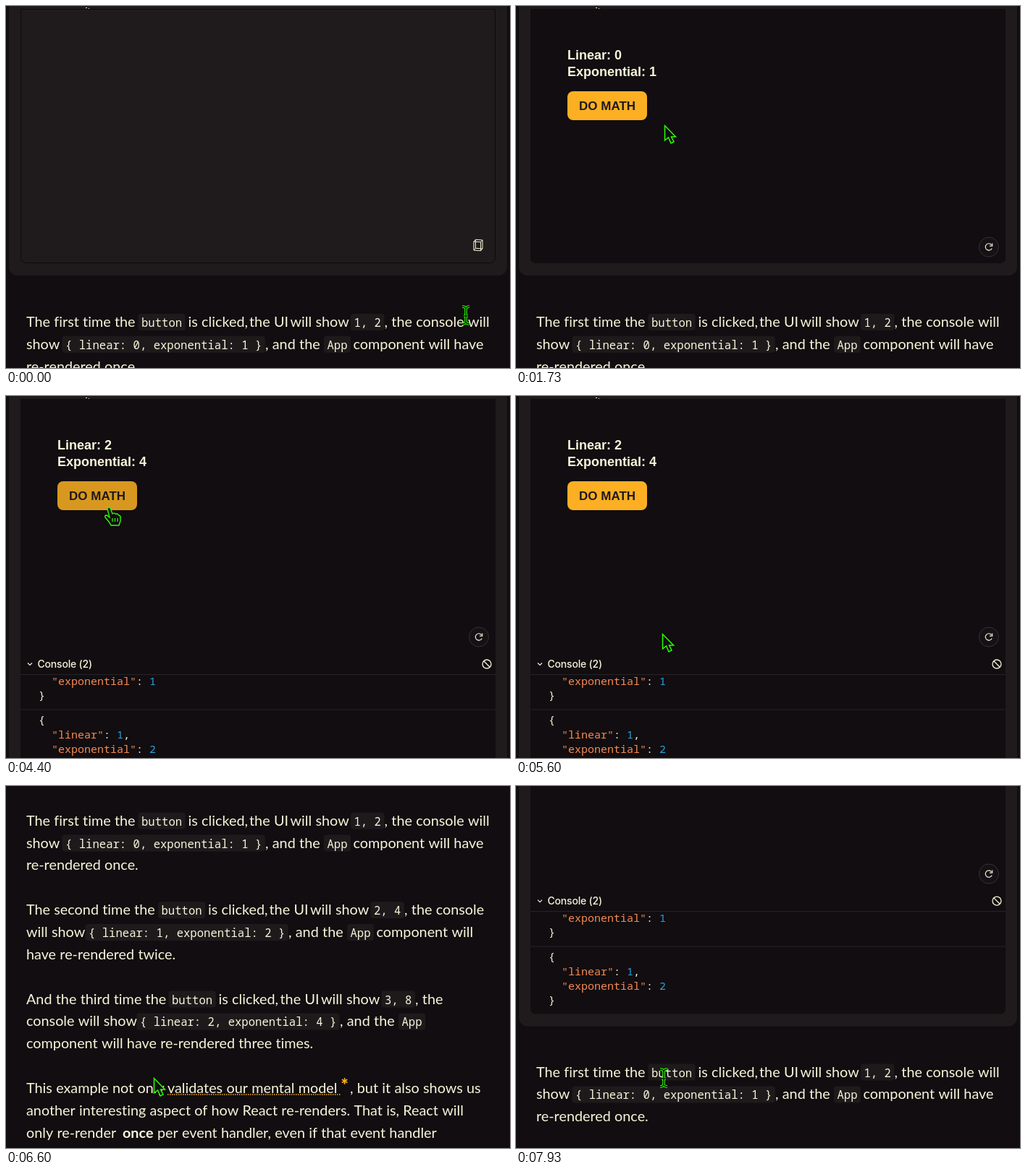
Write an HTML page with a canvas that moves like this. It is 696 px wide and 501 px high and loops after 8000 ms.

```html
<!DOCTYPE html>
<html lang="en">
<head>
<meta charset="utf-8">
<title>Batched state updates</title>
<style>
html, body { margin: 0; width: 100%; height: 100%; overflow: hidden; background: #110d10; }
canvas { display: block; width: 696px; height: 501px; }
</style>
</head>
<body>
<canvas id="stage" width="696" height="501"></canvas>
<script>
const ctx = document.getElementById('stage').getContext('2d');
const LOOP = 8000, LOADED = 450, CLICKS = [2240, 3740];
const PAGE = '#110d10', PANEL = '#1f1b1c', CREAM = '#f9f4da', AMBER = '#fcaf23';
const ORANGE = '#f78a52', BLUE = '#2ba3d8', GREEN = '#2bff00';
const BODY = '19.8px Lato, sans-serif';
const CODE = '500 15.6px "Noto Sans Mono", monospace';
const LINE = 30.85;

// Bottom of the preview box for 0, 1 and 2 logged entries.
const BOX_BOTTOM = [356, 479, 527.5];

// Each line is a list of [x, text, style].
const story = (intro, chipX, ui, uiX, tail) => [
  [28, intro], [chipX, 'button', 'code'], [chipX + 64.5, 'is clicked,'],
  [uiX - 144.5, 'the UI'], [uiX - 88, 'will show'], [uiX, ui, 'code'], [uiX + 42, tail]
];
const result = (intro, x, code, tail = '') => [
  [28, intro], [x, code, 'code'], [x + 276, ', and the'], [x + 361.5, 'App', 'code'], [x + 397.5, tail]
];
const LINES = [
  story('The first time the', 187, '1, 2', 480.5, ', the console will'),
  result('show', 82, '{ linear: 0, exponential: 1 }', 'component will have'),
  [[28, 're-rendered once.']],
  [],
  story('The second time the', 214.5, '2, 4', 508, ', the console'),
  result('will show', 114, '{ linear: 1, exponential: 2 }', 'component will'),
  [[28, 'have re-rendered twice.']],
  [],
  story('And the third time the', 229, '3, 8', 523, ', the'),
  result('console will show', 185, '{ linear: 2, exponential: 4 }'),
  [[28, 'component will have re-rendered three times.']],
  [],
  [[28, 'This example not only'], [223, 'validates our mental model', 'link'], [475, ', but it also shows us']],
  [[28, 'another interesting aspect of how React re-renders. That is, React will']],
  [[28, 'only re-render'], [161, 'once', 'bold'], [209, 'per event handler, even if that event handler']],
  [[28, 'contains updates for multiple pieces of state.']],
  [],
  [[28, 'This is yet another example of how React will only re-render a']]
];

// Pointer stops: [time, x, y].
const STOPS = [
  [0, 635, 428], [150, 635, 428], [1250, 205, 165], [1750, 205, 165], [2080, 141, 154],
  [4500, 141, 154], [5150, 202, 329], [5610, 202, 329], [5720, 204, 404], [LOOP, 204, 404]
];

const ease = p => p * p * (3 - 2 * p);
const ramp = (t, from, to) => ease(Math.min(1, Math.max(0, (t - from) / (to - from))));

function pointerAt(t) {
  const i = STOPS.findIndex(s => s[0] > t), a = STOPS[i - 1], b = STOPS[i];
  const p = ramp(t, a[0], b[0]);
  return [a[1] + (b[1] - a[1]) * p, a[2] + (b[2] - a[2]) * p];
}

function scrollAt(t) {
  if (t < 6450) return 633 * ramp(t, 5700, 6290);
  if (t < 6600) return 633 - 71.5 * ((t - 6450) / 150) ** 2;
  return 211.5 + 350 * Math.exp(-(t - 6600) / 200);
}

function text(str, x, y, font, color = CREAM) {
  ctx.font = font;
  ctx.fillStyle = color;
  ctx.fillText(str, x, y);
}

function box(x, y, w, h, radii, fill, stroke) {
  ctx.beginPath();
  ctx.roundRect(x, y, w, h, radii);
  if (fill) { ctx.fillStyle = fill; ctx.fill(); }
  if (stroke) { ctx.strokeStyle = stroke; ctx.lineWidth = 1; ctx.stroke(); }
}

function draw(d, color, width, fill) {
  const path = new Path2D(d);
  if (fill) { ctx.fillStyle = fill; ctx.fill(path); }
  ctx.strokeStyle = color;
  ctx.lineWidth = width;
  ctx.stroke(path);
}

function at(x, y, paint) {
  ctx.save();
  ctx.translate(x, y);
  paint();
  ctx.restore();
}

function loadingCube(t) {
  const turn = 0.25 + t / 500, corners = [];
  for (let i = 0; i < 4; i++) {
    const a = turn + i * Math.PI / 2 + Math.PI / 4;
    corners.push([7 * Math.cos(a), 2 * Math.sin(a)]);
  }
  let d = '';
  corners.forEach(([x, y], i) => {
    const [nx, ny] = corners[(i + 1) % 4];
    d += `M${x} ${y + 6}V${y - 6}L${nx} ${ny - 6}M${x} ${y + 6}L${nx} ${ny + 6}`;
  });
  at(652, 331, () => draw(d, CREAM, 1));
}

function preview(t, count, hover) {
  if (t < LOADED) {
    box(20.5, 4.5, 655, 351, [0, 0, 7, 7], null, '#0d0a0c');
    loadingCube(t);
    return;
  }
  box(20, 4, 656, BOX_BOTTOM[count] - 4, [0, 0, 7, 7], PAGE);
  const label = 'bold 18px "Liberation Sans", Arial, sans-serif';
  text('Linear: ' + count, 71, 74, label);
  text('Exponential: ' + 2 ** count, 71, 97, label);
  box(71, 118, 110, 40, 8, hover ? '#d8981f' : AMBER);
  text('DO MATH', 87, 144, 'bold 17px "Liberation Sans", Arial, sans-serif', '#1f1a1c');
  at(653, 333.5, () => {
    box(-13.5, -13.5, 27, 27, 14, '#151115', '#363136');
    draw('M4.2 2A4.7 4.7 0 1 1 3.6 -3M4.7 -5V-1.4H1', CREAM, 1.2);
  });
}

function consoleEntry(i, y) {
  const font = '500 15px "Noto Sans Mono", monospace';
  const row = (key, value, comma, baseline) => {
    const colon = 63 + 9 * (key.length + 2);
    text(`"${key}"`, 63, baseline, font, ORANGE);
    text(':', colon, baseline, font);
    text(value, colon + 18, baseline, font, BLUE);
    text(comma, colon + 27, baseline, font);
  };
  text('{', 45, y + 19, font);
  row('linear', i, ',', y + 40);
  row('exponential', 2 ** i, '', y + 60);
  text('}', 45, y + 79, font);
  if (i) { ctx.fillStyle = '#272327'; ctx.fillRect(20, y, 656, 1); }
}

function consolePane(count) {
  if (!count) return;
  const top = 385, bottom = BOX_BOTTOM[count];
  draw('M30 369.5L33 372.5L36 369.5', CREAM, 1.2);
  ctx.letterSpacing = '-0.2px';
  text(`Console (${count})`, 43.5, 375.5, '500 14px Inter, sans-serif');
  ctx.letterSpacing = '0px';
  draw('M670 371a6 6 0 1 1 -12 0a6 6 0 1 1 12 0M659.8 366.8L668.2 375.2', CREAM, 1.3);
  ctx.fillStyle = '#272327';
  ctx.fillRect(20, top, 656, 1);
  ctx.save();
  ctx.beginPath();
  ctx.rect(20, top + 1, 656, bottom - top - 1);
  ctx.clip();
  for (let i = 0; i < count; i++) consoleEntry(i, bottom - 94 * (count - i));
  ctx.restore();
}

function prose(str, x, y, bold) {
  // Any letter spacing switches the font's "ti" ligature off.
  ctx.letterSpacing = '0.01px';
  ctx.wordSpacing = '0.2px';
  text(str, x, y, bold ? 'bold ' + BODY : BODY);
  ctx.letterSpacing = ctx.wordSpacing = '0px';
}

function article(firstBaseline) {
  LINES.forEach((line, i) => {
    const y = firstBaseline + i * LINE;
    for (const [x, str, style] of line) {
      if (style === 'code') {
        ctx.font = CODE;
        box(x - 4.5, y - 18, ctx.measureText(str).width + 9, 23, 4, '#1e1a1c');
        text(str, x, y, CODE);
        continue;
      }
      prose(str, x, y, style === 'bold');
      if (style === 'link') {
        ctx.setLineDash([1.5, 1.5]);
        draw(`M${x} ${y + 2}H462`, AMBER, 1.5);
        ctx.setLineDash([]);
        text('*', 462.5, y - 3, '900 24px Lato, sans-serif', AMBER);
      }
    }
  });
}

function pointer(x, y, kind) {
  at(x, y, () => {
    if (kind === 'text') {
      const beam = 'M-5 -12Q0 -12 0 -8Q0 -12 5 -12M0 -8V8M-5 12Q0 12 0 8Q0 12 5 12M-3 1H3';
      draw(beam, GREEN, 3.6);
      draw(beam, PAGE, 1.4);
    } else if (kind === 'hand') {
      draw('M-1 2Q0 -1 3 1L6 9Q9 7 10.5 9.5Q13 8 14.5 11Q17 11 17 14V19L15 25H4L1 20L-4 14Q-5 11 -2 11L2 14Z',
        GREEN, 1.4, PAGE);
      draw('M6 15V20M9.5 15V20M13 15V20', GREEN, 1.2);
    } else {
      draw('M.5 .5V21L5.5 17L9 25L13 23L9.5 16H15.5Z', GREEN, 1.5, PAGE);
    }
  });
}

function render(t) {
  const scroll = scrollAt(t), [x, y] = pointerAt(t);
  const count = CLICKS.filter(c => t >= c).length;
  const hover = t >= LOADED && scroll < 1 && x > 71 && x < 181 && y > 118 && y < 158;
  const growth = BOX_BOTTOM[count] - BOX_BOTTOM[0];
  const firstLine = 437 + growth - (count === 2 ? 1 : 0);

  ctx.fillStyle = PAGE;
  ctx.fillRect(0, 0, 696, 501);
  at(0, -scroll, () => {
    box(4, -20, 688, 393 + growth, 12, PANEL);
    ctx.fillStyle = CREAM;
    ctx.fillRect(110, 2, 2, 1);
    ctx.fillRect(114, 3, 1, 1);
    preview(t, count, hover);
    consolePane(count);
    article(firstLine + 7);
  });

  const offset = y + scroll - firstLine, row = Math.round(offset / LINE);
  const onText = LINES[row]?.length && Math.abs(offset - row * LINE) < 10.5;
  pointer(x, y, hover ? 'hand' : onText ? 'text' : 'arrow');
}

function tick() {
  render(performance.now() % LOOP);
  requestAnimationFrame(tick);
}
tick();
</script>
</body>
</html>
```
